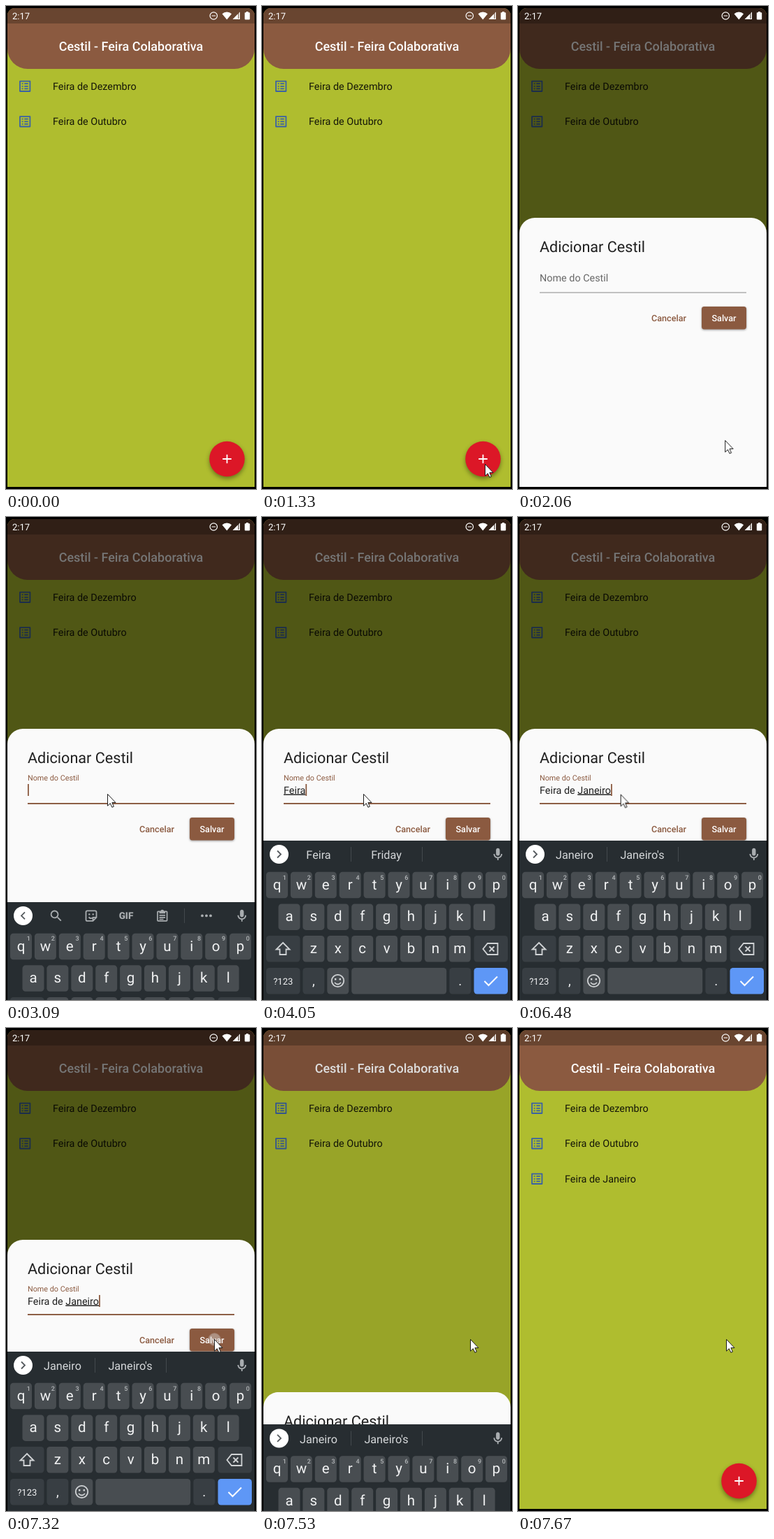
An HTML page that plays this animation: 358x691 px, repeating every 8000 ms.

```html
<!DOCTYPE html>
<html lang="pt">
<head>
<meta charset="utf-8">
<title>Cestil</title>
<style>
html, body { margin: 0; width: 100%; height: 100%; overflow: hidden; background: #000; }
svg { display: block; width: 358px; height: 691px; }
text { font-family: Roboto, sans-serif; font-size: 14.4px; white-space: pre; text-rendering: geometricPrecision; }
.mid { text-anchor: middle; }
.med { font-weight: 500; }
.line { fill: none; stroke-width: 1.8; }
.typing { text-decoration: underline; }

#scrim, #sheet, #keyboard, #label, #focus, #added, #cursor { animation: 8s linear infinite; }
#scrim { animation-name: scrim; }
#sheet { animation-name: sheet; }
#keyboard { animation-name: keyboard; }
#label { animation-name: label; }
#focus { animation-name: focus; }
#added { animation-name: added; }
#cursor { animation-name: cursor; }
.click { opacity: 0; transform-box: fill-box; transform-origin: center; animation: click 8s linear infinite; }

@keyframes scrim {
  0% { opacity: 0; animation-timing-function: step-end; }
  20.6%, 92% { opacity: 1; }
  94.8%, 100% { opacity: 0; }
}
@keyframes sheet {
  0% { transform: translateY(400px); animation-timing-function: step-end; }
  20.6% { transform: none; }
  92.2% { transform: none; animation-timing-function: ease-in; }
  95%, 100% { transform: translateY(400px); }
}
@keyframes keyboard {
  0% { transform: translateY(230px); }
  37.45% { transform: translateY(230px); animation-timing-function: cubic-bezier(.5, 1, .89, 1); }
  40.55% { transform: none; }
  92.4% { transform: none; animation-timing-function: ease-in; }
  95.2%, 100% { transform: translateY(230px); }
}
@keyframes label {
  0%, 35.1% { transform: translate(31px, 394px); fill: #686868; animation-timing-function: cubic-bezier(.4, 0, .2, 1); }
  37.6%, 100% { transform: translate(31px, 377px) scale(.75); fill: #8b5a40; }
}
@keyframes focus {
  0%, 35.1% { opacity: 0; }
  37.4%, 100% { opacity: 1; }
}
@keyframes added {
  0% { opacity: 0; animation-timing-function: step-end; }
  95%, 100% { opacity: 1; }
}
@keyframes cursor {
  0% { transform: translate(322px, 694px); }
  5% { transform: translate(322px, 694px); animation-timing-function: ease-out; }
  10.5% { transform: translate(319px, 655px); }
  24.2% { transform: translate(319px, 655px); animation-timing-function: ease-in-out; }
  30.4% { transform: translate(145px, 396px); }
  80.4% { transform: translate(145px, 396px); animation-timing-function: ease-in-out; }
  88.6%, 100% { transform: translate(298px, 445px); }
}
@keyframes click {
  0% { opacity: .85; transform: scale(.5); }
  3.6% { opacity: 0; transform: scale(1); }
  100% { opacity: 0; }
}
</style>
</head>
<body>
<svg viewBox="0 0 358 691">
  <defs>
    <clipPath id="screen"><path d="M2 688V14a11 11 0 0 1 11-11H345a11 11 0 0 1 11 11V688Z"/></clipPath>
    <path id="list" d="M19 5v14H5V5h14m1.1-2H3.9c-.5 0-.9.4-.9.9v16.2c0 .4.4.9.9.9h16.2c.4 0 .9-.5.9-.9V3.9c0-.5-.5-.9-.9-.9zM11 7h6v2h-6zm0 4h6v2h-6zm0 4h6v2h-6zM7 7h2v2H7zm0 4h2v2H7zm0 4h2v2H7z"/>
  </defs>

  <g clip-path="url(#screen)">
    <rect width="358" height="691" fill="#afbd2f"/>
    <path d="M2 3H356V61a29 29 0 0 1-29 29H31a29 29 0 0 1-29-29Z" fill="#8b5a40"/>
    <rect width="358" height="25" fill="#694530"/>
    <text class="mid med" x="179" y="64" fill="#fff" style="font-size:18px">Cestil - Feira Colaborativa</text>
    <g id="items" fill="#151708"></g>
    <g style="filter:drop-shadow(0 3px 3px #0006)"><circle cx="316.5" cy="648" r="25.3" fill="#dc1727"/></g>
    <path d="M310.2 648H322.8M316.5 641.7V654.3" stroke="#fff" stroke-width="1.8"/>

    <rect id="scrim" width="358" height="691" fill="#000" fill-opacity=".54"/>

    <g id="sheet">
      <path d="M2 691V325a22 22 0 0 1 22-22H334a22 22 0 0 1 22 22V691Z" fill="#fafafa"/>
      <text x="31" y="352" fill="#202020" style="font-size:21.6px">Adicionar Cestil</text>
      <text id="label">Nome do Cestil</text>
      <rect x="31" y="409.5" width="296" height="1" fill="#888"/>
      <rect id="focus" x="31" y="409" width="296" height="1.9" fill="#8b5a40"/>
      <text x="31" y="395.5" fill="#202020"><tspan id="done"></tspan><tspan id="word" class="typing"></tspan></text>
      <rect id="caret" y="382" width="1.8" height="17" fill="#8b5a40"/>
      <g class="mid med">
        <text x="216" y="451" fill="#8b5a40" style="font-size:12.6px">Cancelar</text>
        <rect x="263" y="430" width="64" height="32.4" rx="3.6" fill="#8b5a40" style="filter:drop-shadow(0 1.5px 1.5px #0006)"/>
        <text x="295" y="451" fill="#fff" style="font-size:12.6px">Salvar</text>
      </g>
    </g>

    <g fill="#fff">
      <text x="9" y="18.7" style="font-size:13px">2:17</text>
      <circle cx="297.3" cy="14" r="5.2" fill="none" stroke="#fff" stroke-width="1.2"/>
      <path d="M294.5 13.4h5.6v1.2h-5.6zM309.5 11.2a10 10 0 0 1 13.6 0L316.3 19.6Z"/>
      <path d="M335 8.6V19H324.6Z" fill-opacity=".4"/>
      <path d="M332 11.6V19H324.6ZM333.8 9.8L335 8.6V19H324.6L325.6 18H333.8Z"/>
      <path d="M344 8h3v1.2h1.4q.8 0 .8.8V18.6q0 .8-.8.8H342.6q-.8 0-.8-.8V10q0-.8.8-.8H344Z"/>
    </g>
  </g>

  <g id="keyboard">
    <rect x="2" y="463" width="354" height="228" fill="#272d31"/>
    <circle cx="24.5" cy="482.5" r="13.5" fill="#fff"/>
    <g id="tools" fill="#a9adb0" stroke="none">
      <path class="line" stroke="#555a5e" d="M27 477.5l-5 5 5 5"/>
      <path transform="translate(61 472) scale(.9)" d="M15.5 14h-.79l-.28-.27A6.47 6.47 0 0 0 16 9.5 6.5 6.5 0 1 0 9.5 16c1.61 0 3.09-.59 4.23-1.57l.27.28v.79l5 4.99L20.49 19zm-6 0C7.01 14 5 11.99 5 9.5S7.01 5 9.5 5 14 7.01 14 9.5 11.99 14 9.5 14z"/>
      <g class="line" stroke="#a9adb0">
        <path d="M116.500 475.500H127.500q2 0 2 2V485L124.500 490H116.500q-2 0-2-2V477.500q0-2 2-2ZM124.500 490V485H129.500M118.500 484.500q2.500 3 5 1"/>
      </g>
      <circle cx="119.300" cy="480.500" r="1.200"/><circle cx="124.700" cy="480.500" r="1.200"/>
      <text class="mid" x="172" y="487" style="font-size:13.500px;font-weight:900">GIF</text>
      <path transform="translate(213.600 473) scale(.85)" d="M19 3h-4.180C14.400 1.840 13.300 1 12 1s-2.400.840-2.820 2H5c-1.100 0-2 .900-2 2v14c0 1.100.900 2 2 2h14c1.100 0 2-.900 2-2V5c0-1.100-.900-2-2-2zm0 16H5V5h2v2.500h10V5h2zM7 9.500h10v2H7zm0 3.500h10v2H7zm0 3.200h7v1.800H7z"/>
      <rect x="255" y="472" width="1" height="21" fill="#43494d"/>
      <circle cx="281" cy="482.500" r="1.900"/><circle cx="287" cy="482.500" r="1.900"/><circle cx="293" cy="482.500" r="1.900"/>
    </g>
    <g id="hints" class="mid" fill="#d5d8da">
      <path class="line" stroke="#555a5e" d="M22 477.500l5 5-5 5"/>
      <path d="M127 472h1v21h-1zM229 472h1v21h-1z" fill="#43494d"/>
      <text class="hint" x="81" y="489.300"></text>
      <text class="hint" x="178" y="489.300"></text>
      <text class="hint" x="275" y="489.300"></text>
    </g>
    <path transform="translate(327 472) scale(.9)" fill="#a9adb0" d="M12 14c1.660 0 3-1.340 3-3V5c0-1.660-1.340-3-3-3S9 3.340 9 5v6c0 1.660 1.340 3 3 3zm5-3c0 2.760-2.240 5-5 5s-5-2.240-5-5H5c0 3.530 2.610 6.430 6 6.920V21h2v-3.080c3.390-.490 6-3.390 6-6.920z"/>
    <g id="keys"></g>
    <g class="line" stroke="#d0d3d5">
      <path d="M30 609l9.500 9.500h-5v7.500h-9v-7.500h-5Z"/>
      <path d="M323 610H337.500V626H323L316.500 618ZM325.500 614.500l7 7m0-7l-7 7"/>
      <circle cx="108.500" cy="663.500" r="8.700"/>
      <path d="M104 666q4.500 5 9 0"/>
      <path d="M318.500 664l6 6L337 657.500" stroke="#fff" stroke-width="2"/>
    </g>
    <path d="M104 660h2.400v2.400H104zM110.600 660H113v2.400h-2.400z" fill="#d0d3d5"/>
  </g>

  <g fill="#d9d9d9">
    <circle class="click" cx="319.500" cy="655.500" r="12" style="animation-delay:1.04s"/>
    <circle class="click" cx="145.500" cy="396.500" r="12" style="animation-delay:2.42s"/>
    <circle class="click" cx="298.500" cy="445.500" r="12" style="animation-delay:7.18s"/>
  </g>
  <path id="cursor" d="M.5.500V17.200L4.300 13.700 6.900 19.300 9.400 18.200 6.900 12.600H12Z" fill="#fff" stroke="#1c1c1c" stroke-width="1"/>
</svg>

<script>
const LOOP = 8000, BLINK = 500, HINT_LAG = 70, FOCUS = 2820;
const $ = id => document.getElementById(id);

// time, field text, keyboard suggestions
const steps = [
  [3500, "F", "F", "Fri", "Friday"],
  [3710, "Fe", "Fe", "Feb", "Friday"],
  [3790, "Fei", "Fei", "Feu", "Friday"],
  [3880, "Feir", "Feir", "Fair", "Friday"],
  [3970, "Feira", "Feira", "Friday", ""],
  [4170, "Feira ", "de", "is", "and"],
  [4230, "Feira d", "d", "do", "day"],
  [4290, "Feira de", "de", "Dec", "day"],
  [4350, "Feira de ", "la", "los", "las"],
  [5110, "Feira de J", "J", "Jan", "January"],
  [5310, "Feira de Ja", "Ja", "Ha", "January"],
  [5510, "Feira de Jan", "Jan", "Jan.", "January"],
  [5640, "Feira de Jane", "Jane", "Jane's", "January"],
  [5780, "Feira de Janei", "Janei", "Jane", "January"],
  [5865, "Feira de Janeir", "Janeir", "Janeiro", "Janeiro's"],
  [6070, "Feira de Janeiro", "Janeiro", "Janeiro's", ""]
];

const item = (name, y, id = "") => `<g id="${id}">
  <use href="#list" transform="translate(16.4 ${y - 10.8}) scale(.9)" fill="#3b62a4"/>
  <text x="67" y="${y + 5}">${name}</text></g>`;
$("items").innerHTML = item("Feira de Dezembro", 114.8) + item("Feira de Outubro", 165.3) +
  item("Feira de Janeiro", 215.8, "added");

const key = (x, y, w, fill, label = "", size = 20.5, dy = 6) =>
  `<rect x="${x}" y="${y}" width="${w}" height="37.500" rx="4.500" fill="${fill}"/>
   <text class="mid" x="${x + w / 2}" y="${y + 19 + dy}" fill="#f1f2f3" style="font-size:${size}px">${label}</text>`;
const LIGHT = "#484d51", DARK = "#383e43", PITCH = 34.9;
const row = (letters, x, y) => [...letters].map((c, i) => key(x + i * PITCH, y, 31, LIGHT, c)).join("");
const digits = [..."1234567890"].map((d, i) =>
  `<text class="mid med" x="${32.300 + i * PITCH}" y="518.500" fill="#b4b8ba" style="font-size:9px">${d}</text>`).join("");

$("keys").innerHTML = row("qwertyuiop", 6, 507.8) + digits + row("asdfghjkl", 23.5, 553.4) +
  key(6, 599, 48.500, DARK) + row("zxcvbnm", 58.4, 599) + key(303.500, 599, 48.500, DARK) +
  key(6, 645, 48.500, DARK, "?123", 13, 5) + key(58.4, 645, 31, DARK, ",", 19) + key(93.3, 645, 31, LIGHT) +
  key(128.2, 645, 136, LIGHT) + key(268.300, 645, 31, DARK, ".", 19) + key(303.500, 645, 48.500, "#5e97f6");

const hints = [...document.querySelectorAll(".hint")];
hints.forEach(h => h.style.fontSize = "16.2px");
const show = (el, on) => el.style.display = on ? "" : "none";
const latest = t => steps.filter(s => s[0] <= t).pop();

function draw(t) {
  const [since, text] = latest(t) || [FOCUS, ""];
  const cut = text.lastIndexOf(" ") + 1;
  $("done").textContent = text.slice(0, cut);
  $("word").textContent = text.slice(cut);
  $("caret").setAttribute("x", 31 + (text && $("done").parentNode.getComputedTextLength()));
  show($("caret"), t >= FOCUS && Math.floor((t - since) / BLINK) % 2 === 0);

  const hint = latest(t - HINT_LAG);
  show($("tools"), !hint);
  show($("hints"), hint);
  hints.forEach((h, i) => h.textContent = hint ? hint[i + 2] : "");
}

let start;
function tick(now) {
  start ??= now;
  draw((now - start) % LOOP);
  requestAnimationFrame(tick);
}
requestAnimationFrame(tick);
</script>
</body>
</html>
```
